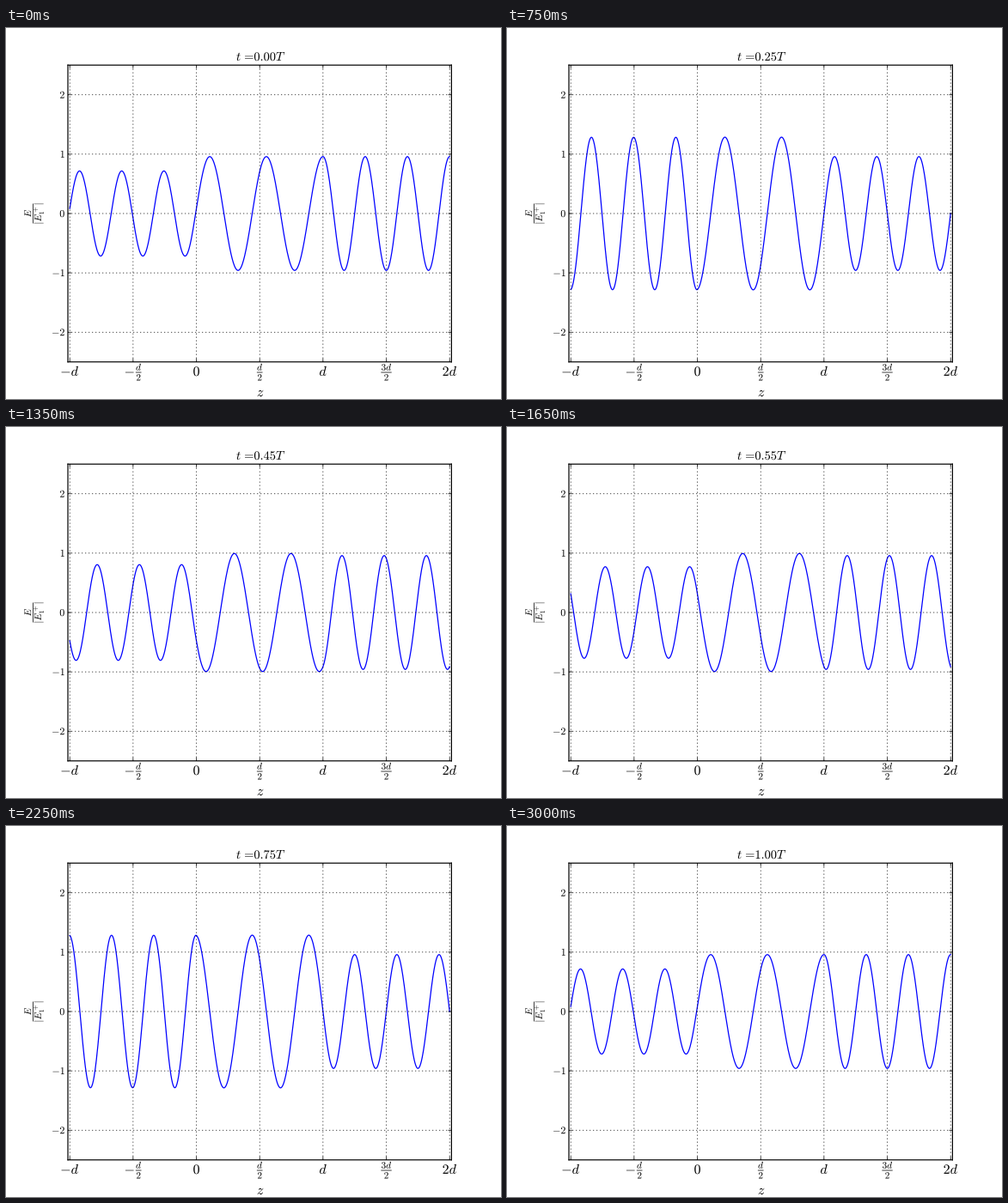
These frames come from a looping animation (576 px wide and 432 px high, 3150 ms). A matplotlib script:

```python
import numpy as np
import matplotlib.pyplot as plt
from matplotlib.animation import FuncAnimation
from matplotlib.lines import Line2D
from matplotlib.patches import PathPatch
from matplotlib.textpath import TextPath
from matplotlib.transforms import Affine2D

W, H, DPI = 576, 432, 72
STEPS, INTERVAL = 21, 150

# Unsnapped lines keep their fractional pixel positions
plt.rcParams.update({"mathtext.fontset": "cm", "path.snap": False})

# Wave numbers in units of 1/d: outer media and the slab 0 < z < d
K1 = 6 * np.pi
K2 = K1 * np.sqrt(5 / 9)


def field(z):
    """Complex amplitude of a wave crossing the slab, incident part of size 1."""
    c, s = np.cos(K2), np.sin(K2)
    e0 = c - 1j * K1 / K2 * s
    slope0 = K2 * s + 1j * K1 * c
    before = e0 * np.cos(K1 * z) + slope0 / K1 * np.sin(K1 * z)
    inside = np.cos(K2 * (z - 1)) + 1j * K1 / K2 * np.sin(K2 * (z - 1))
    after = np.exp(1j * K1 * (z - 1))
    incident = abs(e0 + slope0 / (1j * K1)) / 2
    return np.where(z < 0, before, np.where(z < 1, inside, after)) / incident


fig = plt.figure(figsize=(W / DPI, H / DPI), dpi=DPI, facecolor="white")
ax = fig.add_axes([0.125, 0.1, 0.775, 0.8])
ax.set_xlim(-1.015, 2.015)
ax.set_ylim(-2.5, 2.5)
ax.set_axisbelow(False)
xticks = np.arange(-1, 2.1, 0.5)
yticks = np.arange(-2, 3)
ax.set_xticks(xticks)
ax.set_yticks(yticks)
ax.tick_params(length=0, labelbottom=False, labelleft=False)
ax.grid(True, color="black", linestyle=(0, (1.6, 4)), linewidth=0.7)
ax.grid(True, linestyle=(0, (1.25 / 0.7, 2.75 / 0.7)))
for spine in ax.spines.values():
    spine.set_linewidth(1.2)

# Tick marks, 4 px inward from all four sides
tx, ty = 4 / (0.8 * H), 4 / (0.775 * W)
for a, b in ((0, tx), (1 - tx, 1)):
    ax.vlines(xticks, a, b, color="black", linewidth=0.7,
              transform=ax.get_xaxis_transform())
for a, b in ((0, ty), (1 - ty, 1)):
    ax.hlines(yticks, a, b, color="black", linewidth=0.7,
              transform=ax.get_yaxis_transform())


def glyphs(text, size, ha="center"):
    """Outline of a formula, shifted so that its anchor is at x = 0."""
    path = TextPath((0, 0), text, size=size)
    box = path.get_extents()
    shift = box.x1 if ha == "right" else (box.x0 + box.x1) / 2
    return path.transformed(Affine2D().translate(-shift, 0))


def place(x, y, turn=0):
    """Pixel placement with y down, after turning by some degrees."""
    move = Affine2D().rotate_deg(turn).translate(x, H - y).scale(1 / DPI)
    return move + fig.dpi_scale_trans


def label(x, y, text, size, ha="center", turn=0):
    patch = PathPatch(glyphs(text, size, ha), facecolor="black", linewidth=0,
                      transform=place(x, y, turn))
    return fig.add_artist(patch)


def fraction(x, y, num, den, width, turn=0):
    """Fraction at 70 % of 16 px whose bar is centred on (x, y)."""
    c, s = np.cos(np.radians(turn)), np.sin(np.radians(turn))
    for text, drop in ((num, -2.3), (den, 9.5)):
        label(x + s * drop, y + c * drop, text, 11.2, turn=turn)
    fig.add_artist(Line2D([-width / 2, width / 2], [0, 0], color="black",
                          linewidth=0.75, transform=place(x, y, turn)))


def to_px(x, y):
    px, py = ax.transData.transform((x, y))
    return px, H - py


BASE, BAR = 405, 401
px = [to_px(x, 0)[0] for x in xticks]
for i, name in ((0, "$-d$"), (2, "$0$"), (4, "$d$"), (6, "$2d$")):
    label(px[i], BASE, name, 16)
label(px[1] - 4.1, BASE, "$-$", 16)
fraction(px[1] + 6.3, BAR, "$d$", "$2$", 5.9)
fraction(px[3], BAR, "$d$", "$2$", 5.9)
fraction(px[5], BAR, "$3d$", "$2$", 11.6)
for y in yticks:
    label(67.8, to_px(0, y)[1] + 4, f"${y}$", 12, ha="right")
label(296, 429, "$z$", 16)
fraction(31.5, 216, "$E$", "$|E_1^+|$", 22.2, turn=90)


def title_path(t):
    return glyphs(rf"$t\hspace{{0.12}}=\hspace{{-0.2}}\mathbf{{{t:.2f}}}T$", 14.4)


title = label(296.2, 38, "$t$", 14.4)
z = np.linspace(-1, 2, 1000)
wave = field(z)
line, = ax.plot(z, wave.real, color="blue", linewidth=1.25)


def update(i):
    t = i / (STEPS - 1)
    line.set_ydata((wave * np.exp(-2j * np.pi * t)).real)
    title.set_path(title_path(t))
    return line, title


anim = FuncAnimation(fig, update, frames=STEPS, interval=INTERVAL,
                     repeat=True, repeat_delay=0)
plt.show()
```
